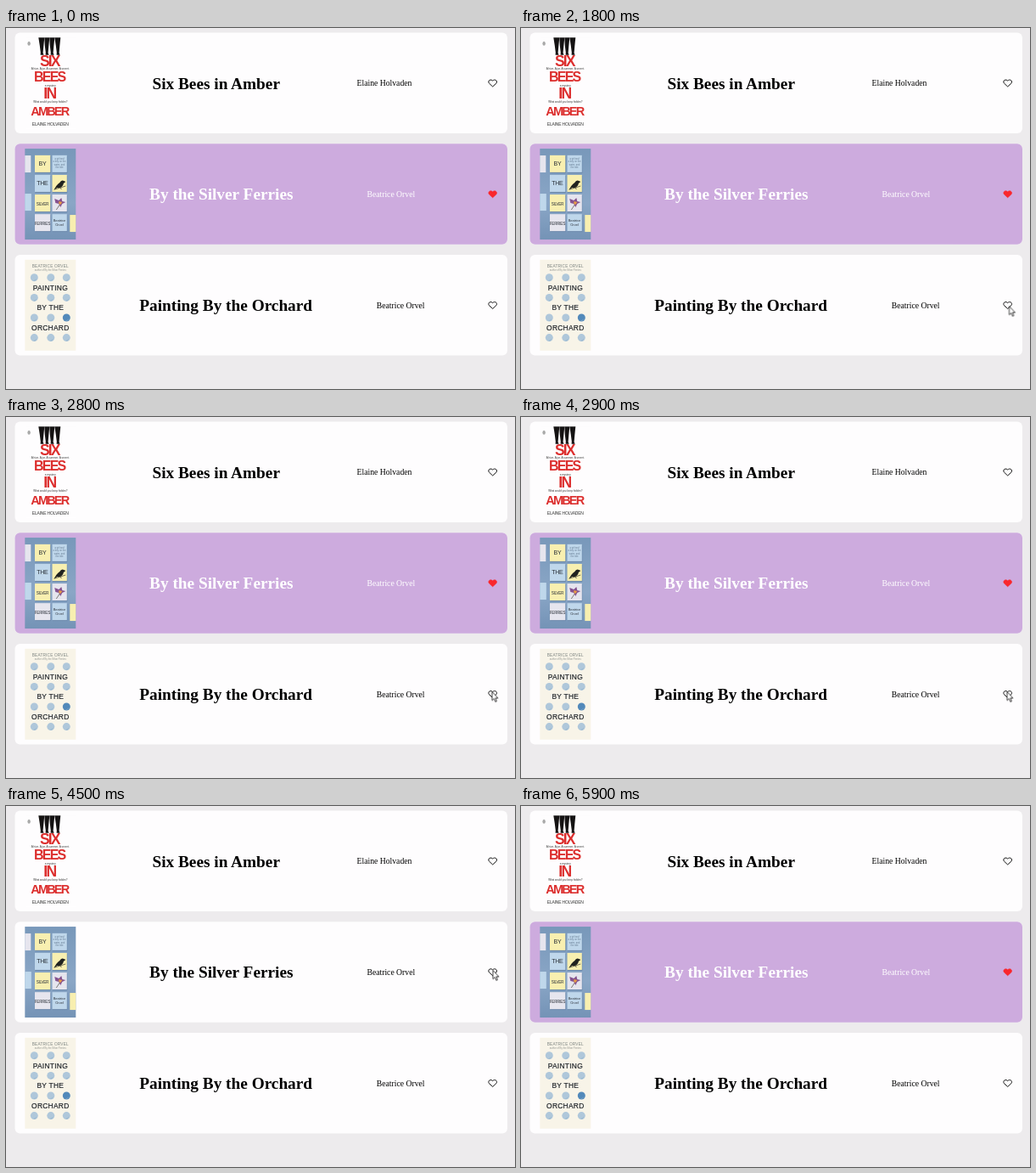
Animation of 600 by 425 pixels, one loop 6100 ms. Source, as an HTML page:

```html
<!DOCTYPE html>
<html lang="en">
<head>
<meta charset="utf-8">
<title>Favourite books</title>
<style>
  html, body { margin: 0; width: 100%; height: 100%; overflow: hidden; background: #edebed; }
  svg { display: block; width: 600px; height: 425px; }
  text { font-family: "Liberation Serif", "Times New Roman", serif; }
  .title { font-size: 19.3px; font-weight: bold; text-anchor: middle; }
  .author { font-size: 9.7px; text-anchor: middle; }
  .heart { stroke-linejoin: round; }
  .off .panel { fill: #fefdfe; }
  .off .heart { fill: none; stroke: #111; stroke-width: 1; }
  .on .panel { fill: #cdabde; }
  .on text { fill: #fff; }
  .on .heart { fill: #f9272d; stroke: #f9272d; stroke-width: .6; }
  .cover text { text-anchor: middle; font-family: "Liberation Sans", Arial, sans-serif; }

  .on { visibility: hidden; }
  .on.middle { animation: middle 6.1s step-end infinite; }
  .on.last { animation: last 6.1s step-end infinite; }
  @keyframes middle {
    0%, 75.4%, 100% { visibility: visible; }
    65.57% { visibility: hidden; }
  }
  @keyframes last {
    0%, 45.9%, 100% { visibility: hidden; }
    32.78% { visibility: visible; }
  }

  #cursor {
    fill: #fff; stroke: #222; stroke-width: .85; stroke-linejoin: round;
    animation: move 6.1s linear infinite, show 6.1s step-end infinite;
  }
  @keyframes show {
    0%, 80.32%, 100% { visibility: hidden; }
    13.11% { visibility: visible; }
  }
  @keyframes move {
    0%, 13.11% { transform: translate(597px, 418px); }
    18.03% { transform: translate(589.5px, 349px); }
    22.95% { transform: translate(586px, 343.5px); }
    29.5%, 33.5% { transform: translate(575.5px, 327.5px); }
    37.7% { transform: translate(589px, 338px); }
    42.62%, 49.18% { transform: translate(573px, 323.5px); }
    54.1% { transform: translate(573.5px, 227px); }
    57.4%, 62.3% { transform: translate(574px, 191.5px); }
    67%, 100% { transform: translate(574px, 193.5px); }
  }
</style>
</head>
<body>
<svg id="stage" viewBox="0 0 600 425"></svg>
<script>
const text = (x, y, s, size, fill, extra = "") =>
  `<text x="${x}" y="${y}" font-size="${size}" fill="${fill}" ${extra}>${s}</text>`;
const rect = (x, y, w, h, fill) =>
  `<rect x="${x}" y="${y}" width="${w}" height="${h}" fill="${fill}"/>`;
const path = (d, fill) => `<path d="${d}" fill="${fill}"/>`;

const HEART = "M5 8.1L.9 4.3C-.3 3.1 0 1.1 1.4.5C2.7-.1 4.1.2 5 1.2C5.9.2 7.3-.1 8.6.5C10 1.1 10.3 3.1 9.1 4.3Z";

// Covers are drawn in a 60 x 107 box.
function amberCover() {
  const bold = 'font-weight="bold" letter-spacing="-1.8"';
  const red = "#dc2f2e";
  const legs = [[16, 7], [23, 6], [29, 6], [35, 7]].map(([x, w]) =>
    path(`M${x} 0h${w}l-1 10l-.7 8l1 2.5h-4l.2-3l-1-8Z`, "#151313")).join("");
  return rect(0, 0, 60, 107, "#fefdfe") + legs +
    '<ellipse cx="4.8" cy="7" rx="1.7" ry="2.5" fill="#a9a9a9"/>' +
    text(29, 33.5, "SIX", 17.5, red, bold) +
    text(30, 38, "A hive. A jar. A summer. A secret.", 3.1, "#333") +
    text(29, 52, "BEES", 16, red, bold) +
    text(30, 57.5, "a mystery", 3, "#333") +
    text(29, 72, "IN", 17.5, red, bold) +
    text(30, 77, "What would you keep hidden?", 3, "#333") +
    text(29, 91.5, "AMBER", 14.5, red, bold) +
    text(30, 104, "ELAINE HOLVADEN", 5, "#333", 'letter-spacing="-.2"');
}

function ferriesCover() {
  const yellow = "#f8efb0", blue = "#bfd7eb", pale = "#e6e5ee", shade = "#6785a8";
  const rows = [
    ["BY", yellow, blue], ["THE", blue, yellow],
    ["SILVER", yellow, pale], ["FERRIES", pale, blue]
  ];
  const notes = rows.map(([word, left, right], i) => {
    const y = 7.8 + i * 23.1;
    return rect(12, y + 1, 18.5, 20, shade) + rect(32.5, y + 1, 17.5, 20, shade) +
      rect(11.7, y, 18.3, 20, left) + rect(32.2, y, 17.3, 20, right) +
      text(20.6, y + 12.5, word, word.length > 3 ? 4.7 : 7, "#2a3038", 'letter-spacing="-.3"');
  }).join("");
  const bird = path("M34 49C36 45 38 42 41 40Q43 36 46 38L48 39L45.5 41C45 45 41 47 38 46Z", "#20221f") +
    '<path d="M35 48L48 44M42 46l1 2" stroke="#39372d" stroke-width=".7"/>';
  const flower = path("M35 59l5 2 3-3 1 4 4 1-4 2-2 4-2-4-4-1Z", "#85528f") +
    path("M40 62l4 1-2 3-2-1Z", "#e79a45") +
    '<path d="M41 66l-4 6" stroke="#656157" stroke-width=".8"/>';
  const small = ["a girl and", "a boy on the", "water, and", "the tide"].map((s, i) =>
    text(40.7, 13 + i * 3.4, s, 2.7, "#667b92")).join("");
  return rect(0, 0, 60, 107, "url(#sky)") +
    rect(0, 8, 7, 20, pale) + rect(0, 53, 7.5, 20, blue) + rect(53, 78, 7, 20, yellow) +
    notes + bird + flower + small +
    text(40.7, 86, "Beatrice", 4, "#2a3038") +
    text(40.7, 91, "Orvel", 4, "#2a3038");
}

function orchardCover() {
  const dots = [0, 1, 2, 3].map(r => [11, 30.5, 49].map((x, i) => {
    const fill = r === 2 && i === 2 ? "#5289ba" : "#afc7da";
    const y = 21 + r * 23.6;
    return `<circle cx="${x}" cy="${y}" r="4.5" fill="${fill}"/>` +
      path(`M${x - 3} ${y + 2}q3 3 6-1q-2 5-6 1`, "#8eb0cb");
  }).join("")).join("");
  const ink = 'letter-spacing=".3" stroke="#20252b" stroke-width=".2"';
  return rect(0, 0, 60, 107, "#f8f4e8") + dots +
    text(30, 9, "BEATRICE ORVEL", 4.7, "#7b827f", 'letter-spacing=".2"') +
    text(30, 13, "author of By the Silver Ferries", 2.8, "#8d918c") +
    text(30, 36.2, "PAINTING", 8.4, "#20252b", ink) +
    text(30, 59.7, "BY THE", 8.4, "#20252b", ink) +
    text(30, 83.2, "ORCHARD", 8.4, "#20252b", ink);
}

function layer(state, b) {
  return `<g class="${state} ${b.id}">
    <rect class="panel" x="10.5" y="0" width="580.5" height="118.5" rx="6"/>
    <text class="title" x="${b.titleX}" y="66">${b.title}</text>
    <text class="author" x="${b.authorX}" y="62.6">${b.author}</text>
    <path class="heart" transform="translate(568.7 55.4)" d="${HEART}"/>
  </g>`;
}

const books = [
  { id: "first", title: "Six Bees in Amber", titleX: 247.7, author: "Elaine Holvaden", authorX: 446, cover: amberCover },
  { id: "middle", title: "By the Silver Ferries", titleX: 253.8, author: "Beatrice Orvel", authorX: 453.8, cover: ferriesCover },
  { id: "last", title: "Painting By the Orchard", titleX: 259.2, author: "Beatrice Orvel", authorX: 465.2, cover: orchardCover }
];

const cards = books.map((b, i) => `<g transform="translate(0 ${5.5 + i * 130.75})">
  ${layer("off", b)}${layer("on", b)}
  <g class="cover" transform="translate(22.3 5.8)">${b.cover()}</g>
</g>`).join("");

document.getElementById("stage").innerHTML = `
  <defs><linearGradient id="sky" x2="0" y2="1">
    <stop stop-color="#7898ba"/><stop offset=".6" stop-color="#8aa6c6"/><stop offset="1" stop-color="#7493b6"/>
  </linearGradient></defs>
  ${cards}
  <path id="cursor" d="M0 0V10.2L2.3 8.1L3.9 11.8L5.5 11.1L3.9 7.5H7Z"/>`;
</script>
</body>
</html>
```
